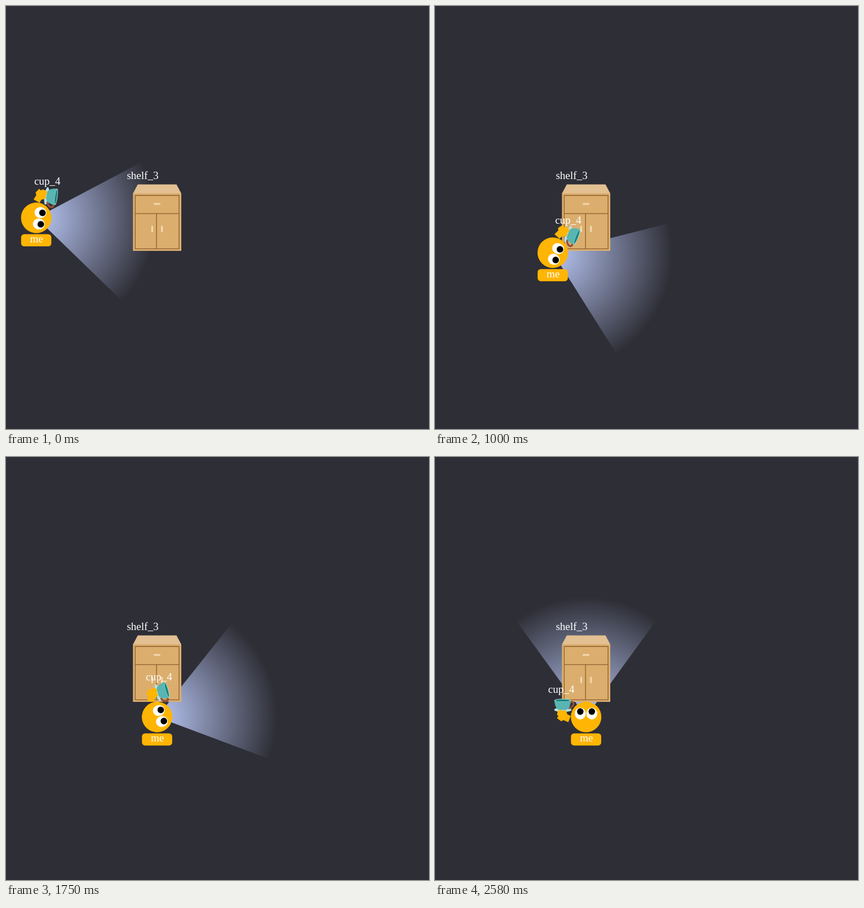
Animation, 748 px wide and 748 px high, one loop 2870 ms. Source, as an HTML page:

```html
<!DOCTYPE html>
<html lang="en">
<head>
<meta charset="utf-8">
<title>Carrying a cup to the shelf</title>
<style>
  html, body { margin: 0; height: 100%; overflow: hidden; background: #2e2e36; }
  svg { display: block; width: 100vw; height: 100vh; }
  text { font: 19px "Liberation Serif", serif; fill: #fff; text-anchor: middle; }
</style>
</head>
<body>
<svg viewBox="0 0 748 748">
  <defs>
    <radialGradient id="light" gradientUnits="userSpaceOnUse" cx="0" cy="0" r="212">
      <stop offset="0" stop-color="#b9c7f5"/>
      <stop offset="1" stop-color="#b9c7f5" stop-opacity="0"/>
    </radialGradient>
  </defs>

  <path id="cone" d="M0 0L-124.6 -171.5A212 212 0 0 1 124.6 -171.5Z" fill="url(#light)"/>

  <g id="shelf">
    <path d="M233 315.5H301.5L310 331.5H224.5Z" fill="#e2c092"/>
    <path d="M224.5 331H310V433H224.5Z" fill="#dbae6e"/>
    <path d="M228.5 335H306V429.3H228.5ZM228.5 367.2H306M266.2 367.2V429.3" fill="none" stroke="#8f5d2c" stroke-width="1.3"/>
    <path d="M262.5 350H271.5M258.5 390V398.5M275.7 390V398.5" stroke="#f3d8ae" stroke-width="3.2" stroke-linecap="round"/>
    <text x="241.7" y="306">shelf_3</text>
  </g>

  <!-- Drawn around the head centre, facing up -->
  <g id="agent">
    <g id="cup">
      <ellipse cx="-41" cy="-12.7" rx="15.5" ry="4" fill="#b9dfe2"/>
      <path d="M-28 -26C-20 -30 -20 -17 -31 -15.5" fill="none" stroke="#94503f" stroke-width="3.4"/>
      <path d="M-56.2 -29.5C-55.5 -19 -52 -12.5 -46 -12.5H-37C-31 -12.5 -27.5 -19 -27 -29.5Z" fill="#58b5b1"/>
      <ellipse cx="-41.6" cy="-29.5" rx="14.4" ry="2.7" fill="#a8dcd8"/>
      <ellipse cx="-41.6" cy="-29.3" rx="12.8" ry="1.9" fill="#168580"/>
    </g>
    <path d="M-50 -11L-45 -13L-42 -11L-36 -12L-33 -4.5L-27.2 -2L-31.5 9.3L-40 5.5L-44 7.5L-47 5.5L-51.5 2L-49 -1.5L-51.5 -4Z" fill="#ffb503"/>
    <circle r="27" fill="#ffb503"/>
    <g fill="#fff">
      <ellipse cx="-10.3" cy="-6" rx="9.6" ry="10.5"/>
      <ellipse cx="10.1" cy="-6" rx="9.6" ry="10.5"/>
    </g>
    <g fill="#000">
      <circle cx="-10.3" cy="-9.6" r="5.8"/>
      <circle cx="10.1" cy="-9.6" r="5.8"/>
    </g>
  </g>

  <g id="badge">
    <rect x="-26.8" y="29" width="53.5" height="21.5" rx="5.5" fill="#ffb503"/>
    <text x="0.6" y="43.5">me</text>
  </g>
  <text id="cupLabel">cup_4</text>
</svg>
<script>
const LOOP = 2870, STEP = 1000 / 24;
const TURNED = 3, ARRIVED = 32, END = 62;
const START = { x: 53.5, y: 374.6, angle: 98.1 };
const GOAL = { x: 267.2, y: 459.7 };
const TRAVEL_ANGLE = 111.8;
const CUP = { x: -38.7, y: -19.7 };

const [cone, agent, badge, cupLabel] =
  ["cone", "agent", "badge", "cupLabel"].map(id => document.getElementById(id));
const lerp = (a, b, k) => a + (b - a) * k;
const progress = (step, from, to) => Math.min(1, Math.max(0, (step - from) / (to - from)));

// Turn towards the goal, walk straight there, then turn to face up.
function draw(time) {
  const step = Math.min(END, Math.floor((time % LOOP + 4.9) / STEP));
  const walked = progress(step, TURNED, ARRIVED);
  const x = lerp(START.x, GOAL.x, walked);
  const y = lerp(START.y, GOAL.y, walked);
  const angle = step < ARRIVED
    ? lerp(START.angle, TRAVEL_ANGLE, progress(step, 0, TURNED))
    : lerp(TRAVEL_ANGLE, 0, progress(step, ARRIVED, END));

  const place = `translate(${x} ${y})`;
  badge.setAttribute("transform", place);
  for (const part of [cone, agent]) part.setAttribute("transform", `${place} rotate(${angle})`);

  // The label follows the cup but stays upright.
  const rad = angle * Math.PI / 180, cos = Math.cos(rad), sin = Math.sin(rad);
  cupLabel.setAttribute("x", x + CUP.x * cos - CUP.y * sin - 5.3);
  cupLabel.setAttribute("y", y + CUP.x * sin + CUP.y * cos - 22.6);
}

const begin = performance.now();
function tick() {
  draw(performance.now() - begin);
  requestAnimationFrame(tick);
}
tick();
</script>
</body>
</html>
```
